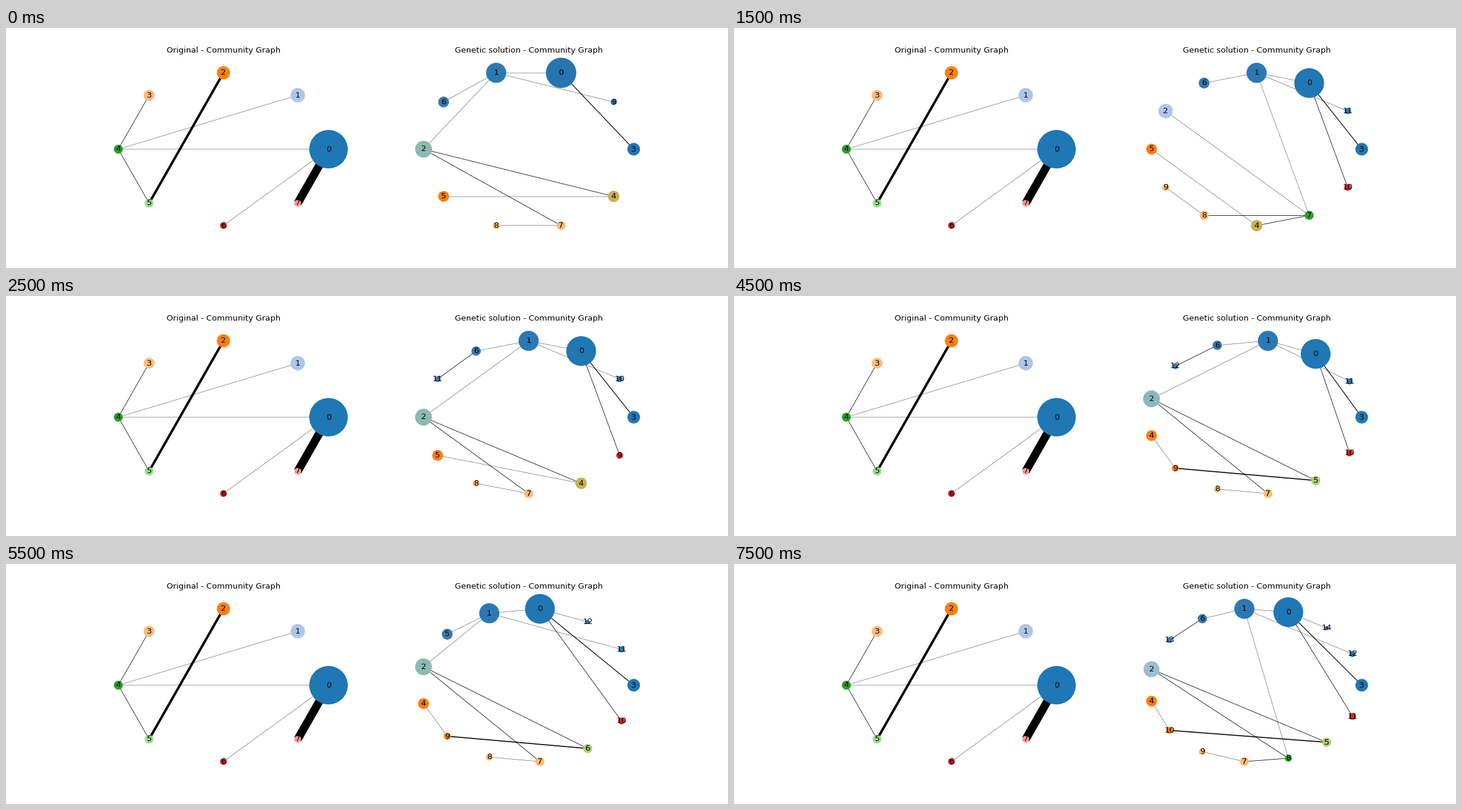
A matplotlib script for the animation above (8000 ms loop, 1200 by 400 pixels).

```python
import numpy as np
import matplotlib.pyplot as plt
from matplotlib.animation import FuncAnimation
from matplotlib.collections import LineCollection

plt.rcParams["font.family"] = "DejaVu Sans"
DPI = 80
PX = 72 / DPI          # points per pixel
EDGE_UNIT = 0.4 * PX   # line width of an edge of weight 1

# Community key: (colour, diameter in pixels)
STYLE = {
    "a": ("#1f77b4", 49.5), "A": ("#2874ae", 50.5), "b": ("#2b79b4", 33.5),
    "c": ("#8bbab1", 28), "C": ("#aec7e8", 24), "k": ("#9bbfcc", 26.5),
    "d": ("#1f77b4", 21), "e": ("#c8b14f", 19), "f": ("#ff7f0e", 18),
    "g": ("#3a79ae", 18), "G": ("#3a79ae", 15.5), "h": ("#ffbb78", 15),
    "i": ("#ffbb78", 11.5), "j": ("#2575b2", 10), "r": ("#d62728", 11.3),
    "v": ("#2ca02c", 15), "V": ("#2ca02c", 11.5), "y": ("#a9cc73", 15),
    "o": ("#ff7f0e", 11.5), "s": ("#3a79ae", 9.5), "t": ("#1f77b4", 7),
    "H": ("#1f77b4", 64), "O": ("#ff7f0e", 22), "P": ("#ffbb78", 18),
    "q": ("#98df8a", 14.5), "x": ("#ff9896", 11.5),
}

# Nodes run counter-clockwise as key + label; edges are key pair + weight.
FIXED = ("H0 C1 O2 P3 v4 q5 r6 x7", "Hv1 Hr1 Hx34 Cv1 Pv2 vq2 Oq10")
HUB = "ab1 ad3 ar2 bj1 "
YELLOW = "bc1 ch2 ce2 ef1 hi1"
GREEN = "bg1 bv1 Cv1 hv2 ev2 ef1 hi1"
LIME = "bc1 cy2 yo4 of1 ch2 hi1"
STATES = [
    ("d3 j9 A0 b1 g6 c2 f5 i8 h7 e4", "Ab1 Ad3 bj1 bg1 " + YELLOW),
    ("d3 j10 a0 b1 g6 c2 f5 i8 h7 e4 r9", HUB + "bg1 " + YELLOW),
    ("d3 j11 a0 b1 g6 C2 f5 i9 h8 e4 v7 r10", HUB + GREEN),
    ("d3 j10 a0 b1 G6 s11 c2 f5 i8 h7 e4 r9", HUB + "bG1 Gs2 " + YELLOW),
    ("d3 j11 t12 a0 b1 g6 C2 f5 i9 h8 e4 v7 r10", HUB + "at1 " + GREEN),
    ("d3 j11 a0 b1 G6 s12 c2 f4 o9 i8 h7 y5 r10", HUB + "bG1 Gs2 " + LIME),
    ("d3 j11 t12 a0 b1 g5 c2 f4 o9 i8 h7 y6 r10", HUB + "at1 bg1 " + LIME),
    ("d3 j11 t13 a0 b1 G6 s12 c2 f4 o9 i8 h7 y5 r10",
     HUB + "at1 bG1 Gs2 " + LIME),
    ("d3 j12 t14 a0 b1 G6 s13 k2 f4 o10 i9 h7 V8 y5 r11",
     HUB + "at1 bG1 Gs2 bV1 ky2 kV2 yo4 of1 hV2 hi1"),
]


def circle_layout(count):
    """Points on a circle, rescaled to fill the unit square."""
    angle = 2 * np.pi * np.arange(count) / count
    points = np.column_stack([np.cos(angle), np.sin(angle)])
    low, high = points.min(axis=0), points.max(axis=0)
    return (points - low) / (high - low)


def draw_graph(ax, title, graph):
    nodes, edges = (part.split() for part in graph)
    keys = [node[0] for node in nodes]
    points = circle_layout(len(nodes))
    place = dict(zip(keys, points))

    ax.clear()
    ax.set_axis_off()
    ax.set(xlim=(-0.105, 1.105), ylim=(-0.105, 1.105))
    ax.set_title(title, fontsize=12)
    ax.add_collection(LineCollection(
        [(place[edge[0]], place[edge[1]]) for edge in edges], colors="black",
        linewidths=[int(edge[2:]) * EDGE_UNIT for edge in edges], zorder=1),
        autolim=False)
    colors, diameters = zip(*(STYLE[key] for key in keys))
    ax.scatter(*points.T, s=(np.array(diameters) * PX) ** 2, c=colors,
               linewidths=0, zorder=2)
    for node, (x, y) in zip(nodes, points):
        ax.text(x, y, node[1:], fontsize=12, ha="center", va="center", zorder=3)


fig, (left, right) = plt.subplots(1, 2, figsize=(15, 5), dpi=DPI)
draw_graph(left, "Original - Community Graph", FIXED)


def update(frame):
    draw_graph(right, "Genetic solution - Community Graph",
               STATES[(frame + 1) // 2])
    return []


anim = FuncAnimation(fig, update, frames=16, interval=500,
                     init_func=lambda: update(0), repeat=True, repeat_delay=0)
plt.show()
```
